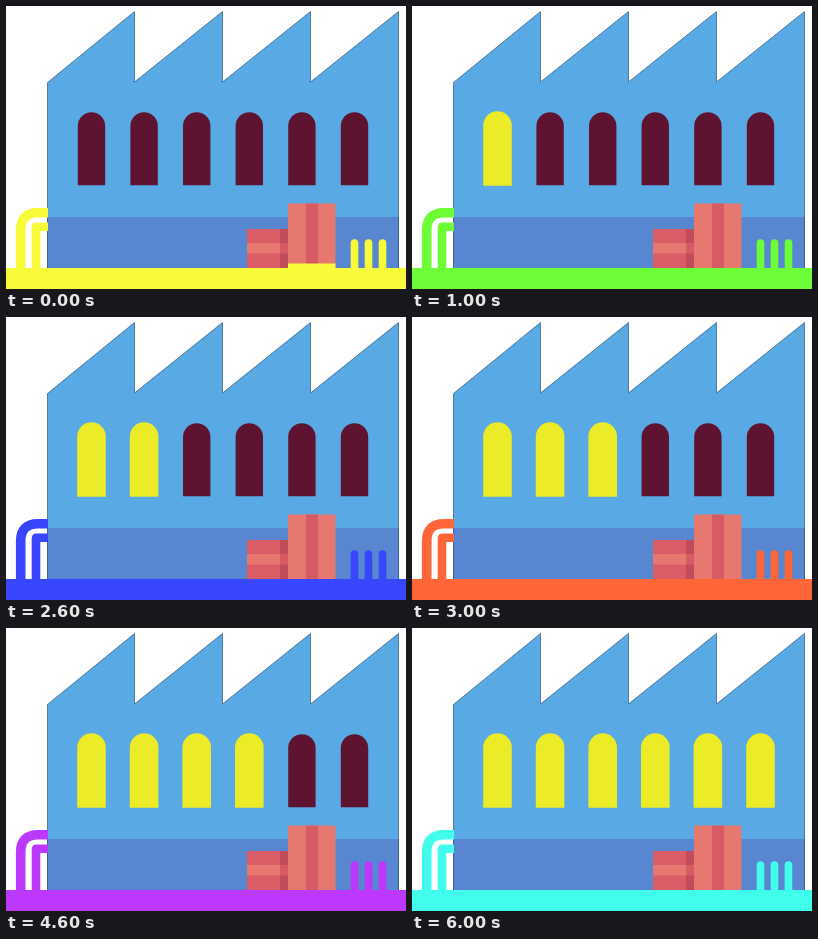
Write an HTML page that moves like this. It is 400 px wide and 283 px high and loops after 7 s.

```html
<!DOCTYPE html>
<html lang="en">
<head>
<meta charset="utf-8">
<title>Factory lights</title>
<style>
html, body { margin: 0; width: 100%; height: 100%; overflow: hidden; background: #fff; }
svg { display: block; width: 100vw; height: 100vh; }
</style>
</head>
<body>
<svg viewBox="0 0 400 283">
  <path d="M41.5 262V76.5L128.5 5.5V76L216.5 5.5V76L304.5 5.5V76L392.5 5.5V262Z" fill="#58a9e4"/>
  <path d="M41 211H393V262H41Z" fill="#5886d1"/>
  <path d="M41.5 262V76.5L128.5 5.5V76L216.5 5.5V76L304.5 5.5V76L392.5 5.5V262" fill="none" stroke="#2d587c" stroke-width=".7"/>
  <g id="windows"></g>
  <g id="pipes" fill="none">
    <path d="M14.7 263V224Q14.7 206.7 32 206.7H42" stroke-width="9.6"/>
    <path d="M30 263V220.7H42" stroke-width="8.6" stroke-linejoin="round"/>
    <path d="M348.5 263V237M362.5 263V237M376.5 263V237" stroke-width="7.6" stroke-linecap="round"/>
  </g>
  <path d="M241 223H282V262H241Z" fill="#d95c66"/>
  <path d="M241 237H274V247.500H241Z" fill="#e7786f"/>
  <path d="M274 223H282V262H274Z" fill="#c24d5a"/>
  <path d="M274 237H282V247.500H274Z" fill="#d75b64"/>
  <path d="M282 197.500H329.500V262H282Z" fill="#e7786f"/>
  <path d="M300 197.500H312V262H300Z" fill="#d75b64"/>
  <path id="strip" d="M282 257.500H329.500V262H282Z"/>
  <path id="ground" d="M0 262H400V283H0Z"/>
</svg>
<script>
const STEP = 1000;
const colors = ['#f8fb3a', '#6dfd37', '#3846fe', '#fe6637', '#bd38fd', '#e85f60', '#41fdec'];
const byId = id => document.getElementById(id);
const [panes, pipes, strip, ground] = ['windows', 'pipes', 'strip', 'ground'].map(byId);

function arch(cx, half, top, bottom) {
  return `M${cx - half} ${bottom}V${top + half}A${half} ${half} 0 0 1 ${cx + half} ${top + half}V${bottom}Z`;
}

const windows = Array.from({ length: 6 }, (_, i) => {
  const path = document.createElementNS('http://www.w3.org/2000/svg', 'path');
  panes.append(path);
  return { path, cx: 85.5 + i * 52.6 };
});

function draw(ms) {
  const step = Math.floor(ms / STEP) % colors.length;
  const color = colors[step];
  windows.forEach(({ path, cx }, i) => {
    const lit = i < step;
    path.setAttribute('d', lit ? arch(cx, 14.3, 105.3, 179.8) : arch(cx, 13.7, 106.3, 179.3));
    path.setAttribute('fill', lit ? '#ebeb27' : '#5e1431');
  });
  pipes.setAttribute('stroke', color);
  ground.setAttribute('fill', color);
  strip.setAttribute('fill', step ? 'none' : color);
}

const start = performance.now();
function tick() {
  draw(performance.now() - start);
  requestAnimationFrame(tick);
}
tick();
</script>
</body>
</html>
```
